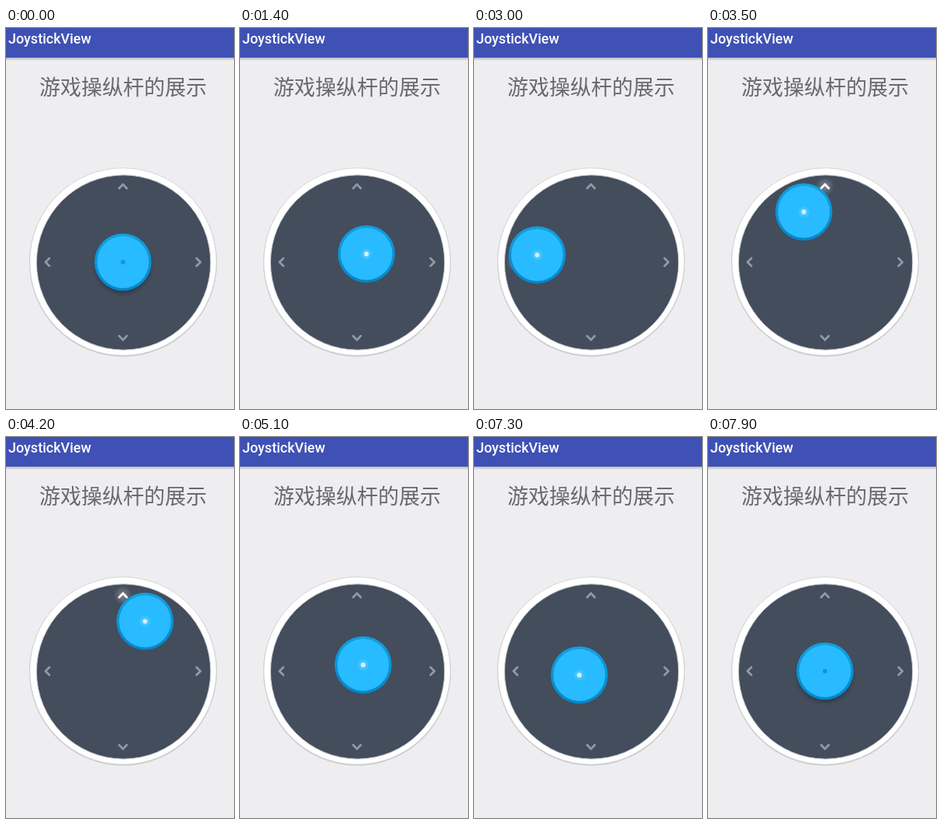
Animation, 294 px wide and 489 px high, one loop 9.9 s. Source, as an HTML page:

```html
<!DOCTYPE html>
<html lang="zh-CN">
<head>
<meta charset="utf-8">
<title>JoystickView</title>
<style>
  html, body { margin: 0; width: 100%; height: 100%; overflow: hidden; background: #eeeef0; }
  svg { display: block; width: 100%; height: 100%; }
  .bar { font: 500 18px Roboto, sans-serif; fill: #fff; }
  .heading { font: 27px "Noto Sans CJK SC", "Noto Sans CJK", sans-serif; fill: #69696b; }
  .chevron { fill: none; stroke-width: 2.8; stroke-linecap: round; stroke-linejoin: round; }
</style>
</head>
<body>
<svg viewBox="0 0 294 489">
  <defs>
    <linearGradient id="barShadow" x2="0" y2="1">
      <stop offset="0" stop-color="#b3b4bd"/>
      <stop offset="1" stop-color="#eeeef0"/>
    </linearGradient>
    <linearGradient id="rim" x2="0" y2="1">
      <stop offset="0" stop-color="#12a0df"/>
      <stop offset="1" stop-color="#0785c9"/>
    </linearGradient>
    <radialGradient id="glow">
      <stop offset="0" stop-color="#fff" stop-opacity=".32"/>
      <stop offset="1" stop-color="#fff" stop-opacity="0"/>
    </radialGradient>
    <filter id="blur" x="-30%" y="-30%" width="160%" height="160%"><feGaussianBlur stdDeviation="2"/></filter>
  </defs>

  <rect width="294" height="489" fill="#eeeef0"/>
  <rect y="38" width="294" height="4" fill="url(#barShadow)"/>
  <rect width="294" height="38" fill="#3f51b5"/>
  <text class="bar" x="3" y="20">JoystickView</text>
  <text class="heading" x="43" y="86">游戏操纵杆的展示</text>

  <circle cx="151" cy="300.8" r="121" fill="#c9c9ce"/>
  <circle cx="151" cy="300" r="120.3" fill="#fff" stroke="#d0d0d4" stroke-width=".8"/>
  <circle cx="151.6" cy="301" r="112.2" fill="#434d5c" stroke="#c6c8cd" stroke-width="1"/>

  <g id="arrows" transform="translate(150.8 300.5)"></g>

  <g id="knob">
    <circle id="shadow" cy="4" r="36" fill="#252d3a" opacity=".65" filter="url(#blur)"/>
    <circle r="36.8" fill="url(#rim)"/>
    <circle r="33.4" fill="#29bbff"/>
    <circle id="dotGlow" r="8" fill="url(#glow)"/>
    <circle id="dot" r="2.9"/>
  </g>
</svg>
<script>
const LOOP = 9900, STEP = 100, REACH = 70;
const HOME = { x: 150.8, y: 300.5 };
const byId = id => document.getElementById(id);
const polar = (deg, r = REACH) => [r * Math.cos(deg * Math.PI / 180), r * Math.sin(deg * Math.PI / 180)];
const at = (time, [x, y]) => ({ time, x, y });

// Each drag: offsets from home over time; the knob snaps back at `end`.
const drags = [
  { end: 4600, keys: [
    at(1400, [12.2, -10.5]), at(1500, [36, -27]), at(1600, polar(-36)),
    at(2200, polar(58)), at(2300, polar(72)), at(3000, polar(187.5)),
    at(3300, polar(227)), at(3600, polar(257)), at(4200, polar(294)),
    at(4300, polar(295)), at(4400, polar(302)), at(4500, polar(310))] },
  { end: 5700, keys: [
    at(5100, [8, -8]), at(5300, [32, -33]), at(5500, polar(-47))] },
  { end: 7900, keys: [
    at(7300, [-15, 5]), at(7400, [-42, 14]), at(7500, [-64, 16]),
    at(7600, [-66, -2]), at(7700, [-62, -25]), at(7800, [-52, -47])] }
];

function offsetAt(time) {
  const drag = drags.find(d => time >= d.keys[0].time && time < d.end);
  if (!drag) return null;
  const i = drag.keys.findLastIndex(k => k.time <= time);
  const a = drag.keys[i], b = drag.keys[i + 1] || a;
  const f = a === b ? 0 : (time - a.time) / (b.time - a.time);
  let x = a.x + (b.x - a.x) * f, y = a.y + (b.y - a.y) * f;
  // Between two points on the rim, stay on the rim.
  const ra = Math.hypot(a.x, a.y), rb = Math.hypot(b.x, b.y);
  const scale = (ra + (rb - ra) * f) / Math.hypot(x, y);
  return { x: x * scale, y: y * scale };
}

const arrows = [0, 90, 180, 270].map(angle => {
  byId("arrows").insertAdjacentHTML("beforeend",
    `<g transform="rotate(${angle}) translate(97.4 0)">
      <circle r="12" fill="url(#glow)"/>
      <path class="chevron" d="M-2.6 -4.9L2.5 0L-2.6 4.9"/>
    </g>`);
  const [halo, chevron] = byId("arrows").lastElementChild.children;
  return { angle, halo, chevron };
});

const clamp01 = v => Math.max(0, Math.min(1, v));
const mix = (from, to, f) => Math.round(from + (to - from) * f);

function draw(time) {
  const offset = offsetAt(time), { x, y } = offset || { x: 0, y: 0 };
  byId("knob").setAttribute("transform", `translate(${HOME.x + x} ${HOME.y + y})`);
  byId("shadow").style.display = offset ? "none" : "";
  byId("dotGlow").style.display = offset ? "" : "none";
  byId("dot").setAttribute("fill", offset ? "#d2f2ff" : "#1297d6");

  const heading = Math.atan2(y, x) * 180 / Math.PI;
  const push = clamp01((Math.hypot(x, y) - 35) / 20);
  for (const { angle, halo, chevron } of arrows) {
    const apart = Math.abs((heading - angle + 900) % 360 - 180);
    const lit = push * clamp01((55 - apart) / 20);
    halo.setAttribute("opacity", lit * lit);
    chevron.setAttribute("stroke", `rgb(${mix(141, 255, lit)},${mix(154, 255, lit)},${mix(170, 255, lit)})`);
  }
}

const start = performance.now();
function tick() {
  const time = (performance.now() - start) % LOOP;
  draw(Math.floor(time / STEP) * STEP);
  requestAnimationFrame(tick);
}
tick();
</script>
</body>
</html>
```
